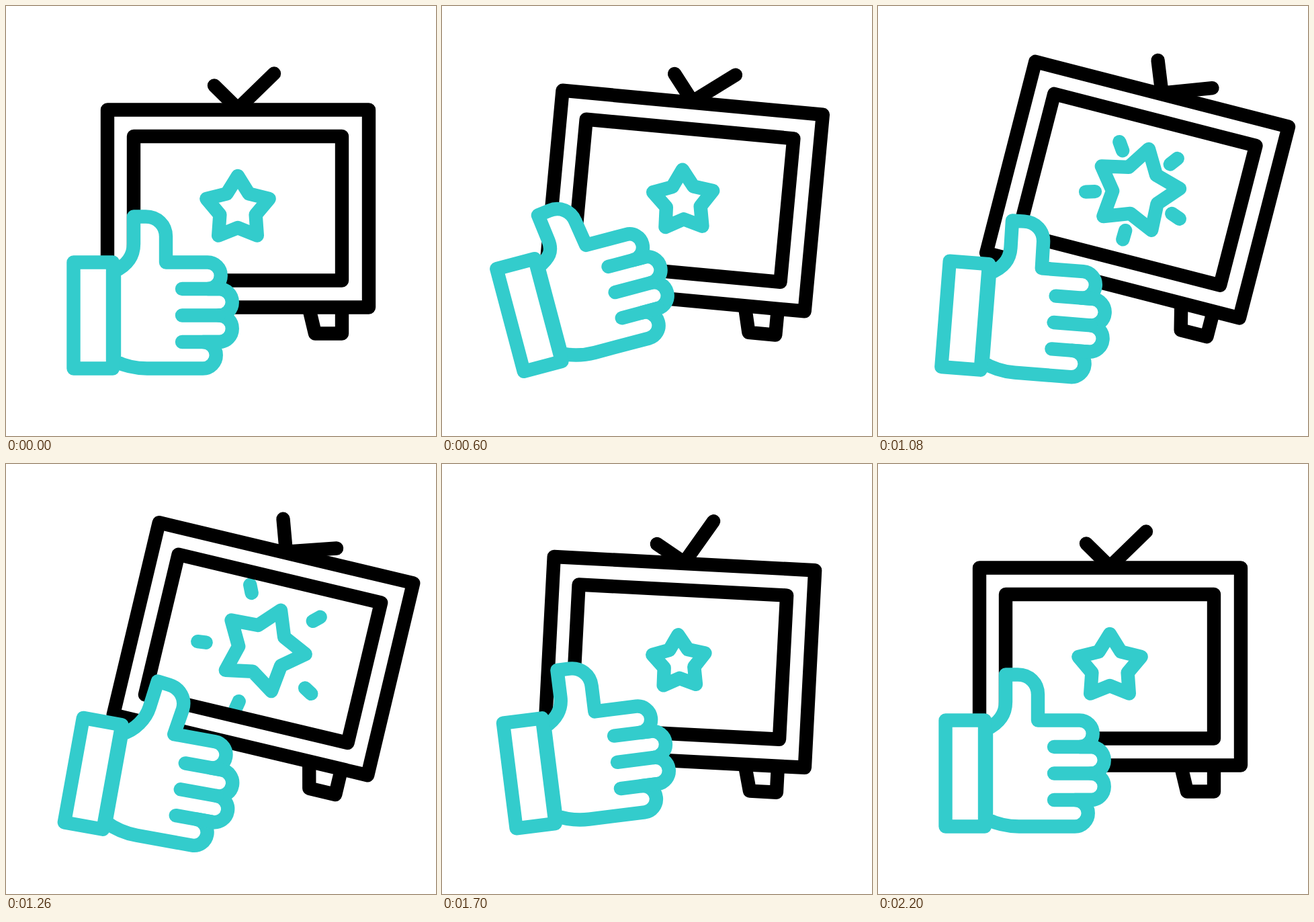
These frames come from a looping animation (640 by 640 pixels, 2.4 s). An HTML page:

```html
<!DOCTYPE html>
<html lang="en">
<head>
<meta charset="utf-8">
<title>Thumbs up for the show</title>
<style>
  html, body { margin: 0; height: 100%; overflow: hidden; background: #fff; }
  svg { display: block; width: 100%; height: 100%; }
  path, rect { fill: none; stroke-width: 20.4; stroke-linecap: round; stroke-linejoin: round; }
  .dark { stroke: #000; }
  .teal { stroke: #3cc; }
  .solid { fill: #fff; }
</style>
</head>
<body>
<svg viewBox="0 0 640 640">
  <g id="tv">
    <g id="spark">
      <path id="rays" class="teal"/>
      <path id="star" class="teal"/>
    </g>
    <g class="dark">
      <rect x="151" y="154.500" width="389" height="294"/>
      <rect x="190" y="194" width="310" height="214.500"/>
      <path d="M451 450L460 487.500H500V452"/>
      <path id="antenna" d="M310 118.500L345 153L399 100.500"/>
    </g>
  </g>
  <g id="hand" class="teal">
    <path id="palm" class="solid"/>
    <path d="M262 421h55m-55 39.500h55m-55 39.500h55"/>
    <rect class="solid" x="100.500" y="381.500" width="58.500" height="158"/>
  </g>
</svg>
<script>
const LOOP = 2400;
const get = id => document.getElementById(id);
const [tv, spark, rays, star, antenna, hand, palm] =
  ['tv', 'spark', 'rays', 'star', 'antenna', 'hand', 'palm'].map(get);

// Smooth rise from 0 to 1 between two times.
function ramp(t, from, to) {
  const u = Math.min(1, Math.max(0, (t - from) / (to - from)));
  return u * u * (3 - 2 * u);
}
// Smooth rise to 1 at the peak and back to 0.
const hump = (t, from, peak, to) => ramp(t, from, peak) - ramp(t, peak, to);

const rad = deg => deg * Math.PI / 180;
const polar = (r, deg) => `${r * Math.cos(rad(deg))} ${r * Math.sin(rad(deg))}`;
const turn = (el, deg, x, y) => el.setAttribute('transform', `rotate(${deg} ${x} ${y})`);
const shape = (el, d) => el.setAttribute('d', d);
const repeat = (n, part) => Array.from({ length: n }, (_, i) => part(i));

const starPath = size =>
  `M${repeat(10, i => polar((i % 2 ? 28 : 49) * size, i * 36 - 90)).join('L')}Z`;

const rayPath = (tail, head) => repeat(5, i => {
  const angle = i * 72 - 54;
  return `M${polar(tail, angle)}L${polar(head, angle)}`;
}).join('');

// The thumb bends around its base; the rest of the palm stays put.
function palmPath(bend) {
  const c = Math.cos(rad(bend)), s = Math.sin(rad(bend));
  const p = (x, y) => {
    const dx = x - 237, dy = y - 390;
    return `${237 + dx * c - dy * s} ${390 + dx * s + dy * c} `;
  };
  const tip = 'a19.750 19.750 0 0 1 0 39.500';
  return `M161 395C180 386 ${p(190, 372)}${p(190, 354)}L${p(190, 313.5)}L${p(208, 313.5)}` +
    `C${p(225, 313.5)}${p(238, 326)}${p(238, 343)}L238 381.500` +
    `H300${tip}H317${tip}${tip}H293${tip}H210Q184 539.500 161 528Z`;
}

function draw(t) {
  const back = hump(t, 200, 800, 1400);
  const forth = hump(t, 800, 1400, 1720);

  // The set tips over, drops and bounces once; its antenna swings after it.
  turn(tv, 15 * hump(t, 200, 1200, 1500) + 4 * hump(t, 1500, 1800, 2100), 476, 448);
  turn(antenna, 27 * hump(t, 240, 1300, 1660) - 15 * hump(t, 1300, 1660, 1900)
    + 6 * hump(t, 1660, 1900, 2140), 345, 153);

  turn(hand, 12 * hump(t, 800, 1210, 1420) - 20 * hump(t, 200, 800, 1210)
    - 10.5 * hump(t, 1420, 1520, 2000), 128, 460);
  shape(palm, palmPath(10 * (forth - back)));

  const spin = 14.5 * forth - 9 * back - 5 * hump(t, 1400, 1720, 2200);
  spark.setAttribute('transform', `translate(345 302) rotate(${spin})`);
  shape(star, starPath(1 - 0.05 * hump(t, 200, 700, 1100)
    + 0.3 * (ramp(t, 800, 1100) - ramp(t, 1260, 1760)) - 0.18 * hump(t, 1260, 1760, 2200)));

  // Rays shoot out from the star until their tails catch up.
  const head = 40 + 58 * ramp(t, 800, 1280);
  const tail = 40 + 58 * ramp(t, 800, 1460);
  shape(rays, head - tail > 0.3 ? rayPath(tail, head) : '');
}

const start = performance.now();
function tick() {
  draw((performance.now() - start) % LOOP);
  requestAnimationFrame(tick);
}
tick();
</script>
</body>
</html>
```
